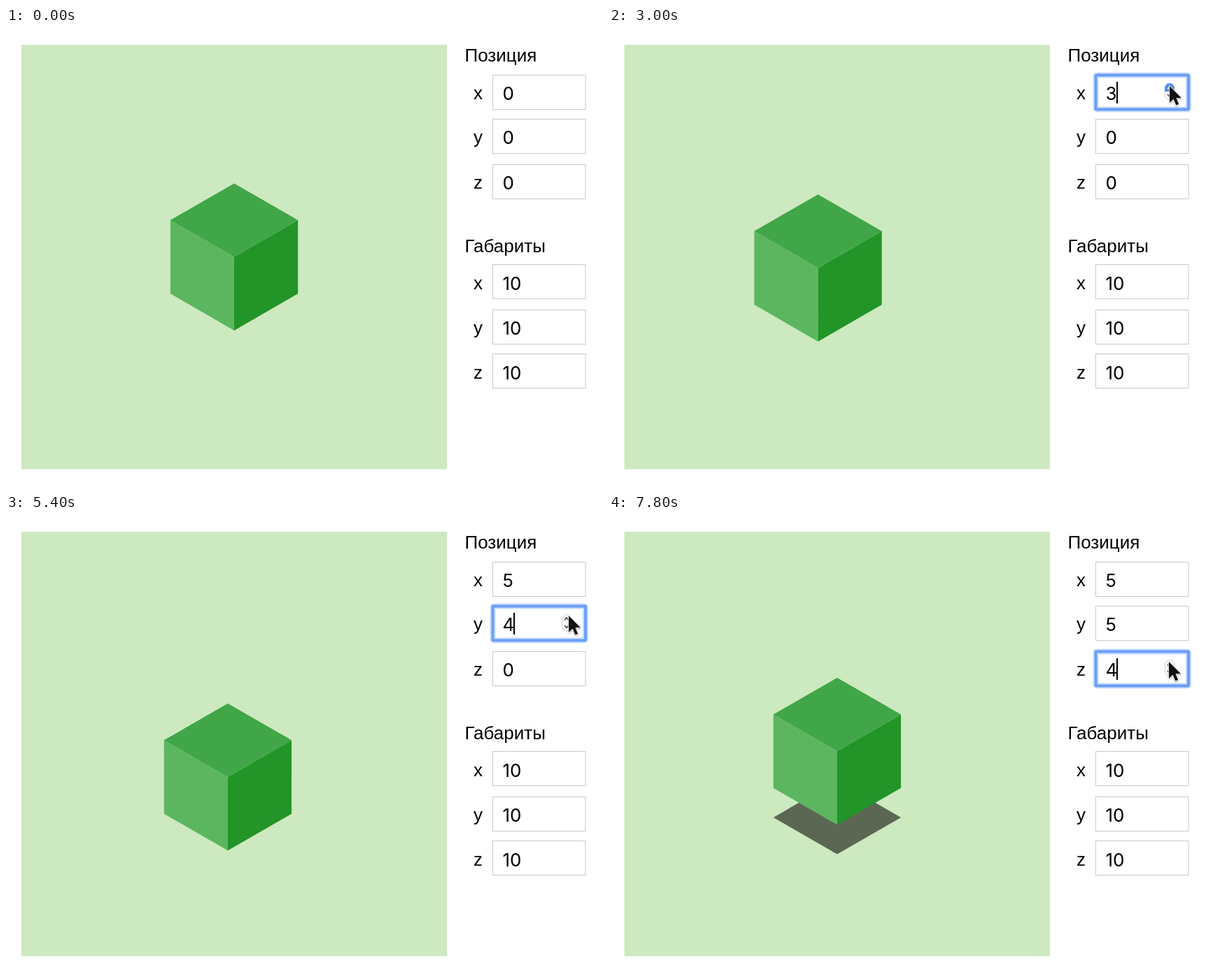
These frames come from a looping animation (853x657 px, 8 s). An HTML page:

```html
<!DOCTYPE html>
<html lang="ru">
<head>
<meta charset="utf-8">
<style>
  html, body { margin: 0; width: 100%; height: 100%; overflow: hidden; background: #fff; }
  svg { display: block; width: 853px; height: 657px; }
  .label { font: 26px "Liberation Sans", sans-serif; }
  .value { font: 26px Inter, sans-serif; }
</style>
</head>
<body>
<svg id="stage" viewBox="0 0 853 657"></svg>
<script>
const LOOP = 8000;
const stage = document.getElementById('stage');

function add(tag, attrs, parent = stage, text = '') {
  const node = document.createElementNS('http://www.w3.org/2000/svg', tag);
  for (const key in attrs) node.setAttribute(key, attrs[key]);
  node.textContent = text;
  parent.append(node);
  return node;
}
const show = (node, visible) => node.setAttribute('visibility', visible ? 'visible' : 'hidden');

// Isometric projection of model units to stage pixels.
const project = (x, y, z) => [326 + (y - x) * 9.11, 327.6 + (x + y) * 5.26 - z * 10.53];
const points = corners => corners.map(c => project(...c).join()).join(' ');

add('rect', { x: 22, y: 24, width: 608, height: 607.5, fill: '#cde9bf' });
const shadow = add('polygon', {
  points: points([[0, 0, -10], [10, 0, -10], [10, 10, -10], [0, 10, -10]].map(([x, y, z]) => [x, y, z])),
  fill: '#5b6653'
});
const cube = add('g', {});
const face = (fill, corners) => add('polygon', { fill, points: points(corners) }, cube);
face('#5cb660', [[10, 0, 0], [10, 10, 0], [10, 10, -10], [10, 0, -10]]);
face('#229428', [[10, 10, 0], [0, 10, 0], [0, 10, -10], [10, 10, -10]]);
face('#40a648', [[0, 0, 0], [10, 0, 0], [10, 10, 0], [0, 10, 0]]);
// The corner-based outline sits ten units high, so lift it to the middle of the field.
const LIFT = -105.2;

function addField(name, top, baseline, value) {
  add('text', { class: 'label', x: 668, y: baseline - 1 }, stage, name);
  const ring = add('g', { fill: 'none', visibility: 'hidden' });
  const box = { x: 695.5, y: top + .5, width: 132.5, height: 49 };
  add('rect', { ...box, fill: '#fff', stroke: '#c8c8c8' });
  stage.append(ring);
  add('rect', { ...box, rx: 2, stroke: '#a9c9fc', 'stroke-width': 8, opacity: .65 }, ring);
  add('rect', { ...box, rx: 1, stroke: '#6a9ff6', 'stroke-width': 4 }, ring);
  const text = add('text', { class: 'value', x: 709.5, y: baseline }, stage, value);
  const caret = add('rect', { y: top + 10, width: 2, height: 31 });

  const mid = top + 24;
  const spinner = add('g', { visibility: 'hidden' });
  add('rect', { x: 794.5, y: mid - 11.5, width: 13, height: 23, rx: 6.5, fill: '#fff', stroke: '#cfcfcf' }, spinner);
  const press = add('path', { d: `M794 ${mid}v-5a7 7 0 0 1 14 0v5z`, fill: '#4f8fec' }, spinner);
  const chevron = (y, dy) => add('path', {
    d: `M798 ${y}l3 ${dy}l3 ${-dy}`, fill: 'none', stroke: '#444', 'stroke-width': 1.5
  }, spinner);
  const up = chevron(mid - 3.5, -3.5);
  chevron(mid + 4, 3.5);
  return { ring, text, caret, spinner, press, up };
}

add('text', { class: 'label', x: 655.5, y: 48 }, stage, 'Позиция');
const fields = [['x', 67, 102.5], ['y', 130, 166], ['z', 195, 230.5]]
  .map(([name, top, base]) => addField(name, top, base, 0));
add('text', { class: 'label', x: 655.5, y: 321 }, stage, 'Габариты');
[['x', 338, 374.5], ['y', 403, 438.5], ['z', 466, 502.5]]
  .forEach(([name, top, base]) => addField(name, top, base, 10).caret.remove());

const cursor = add('path', {
  d: 'M0 0V24L5.6 18.8L9.3 27.6L13.2 25.9L9.5 17.3H17Z',
  fill: '#111', stroke: '#fff', 'stroke-width': 1.6, 'paint-order': 'stroke',
  style: 'filter:drop-shadow(0 1px 1px #0005)'
});

// Each step: start time and the properties that change then.
// at: cursor tip, focus / hover: field index, pos: cube position, down: arrow pressed.
const steps = [
  { t: 0, at: null, focus: -1, hover: -1, pos: [0, 0, 0], down: false },
  { t: 800, at: [578, 400] },
  { t: 1000, at: [650, 262] },
  { t: 1200, at: [738, 142] },
  { t: 1400, at: [773, 104] },
  { t: 1600, at: [784, 95], hover: 0 },
  { t: 1800, at: [790, 89] },
  { t: 2000, at: [798, 85] },
  { t: 2200, at: [801, 83] },
  { t: 2400, focus: 0, pos: [1, 0, 0], down: true },
  { t: 2600, down: false },
  { t: 3000, pos: [3, 0, 0], down: true },
  { t: 3200, pos: [4, 0, 0] },
  { t: 3400, pos: [5, 0, 0] },
  { t: 3600, down: false },
  { t: 4000, at: [802, 97] },
  { t: 4200, at: [803, 120], hover: -1 },
  { t: 4400, at: [804, 139], hover: 1 },
  { t: 4600, at: [804, 144] },
  { t: 4800, focus: 1, pos: [5, 1, 0], down: true },
  { t: 5000, pos: [5, 3, 0] },
  { t: 5200, pos: [5, 4, 0] },
  { t: 5400, down: false },
  { t: 5600, pos: [5, 5, 0], down: true },
  { t: 5800, down: false },
  { t: 6000, at: [803, 166] },
  { t: 6200, at: [802, 192], hover: -1 },
  { t: 6400, at: [802, 210], hover: 2 },
  { t: 6600, focus: 2, pos: [5, 5, 1], down: true },
  { t: 6800, down: false },
  { t: 7000, pos: [5, 5, 2], down: true },
  { t: 7200, pos: [5, 5, 3], down: false },
  { t: 7600, at: [800, 210], pos: [5, 5, 4], down: true },
  { t: 7800, down: false }
];
steps.forEach((step, i) => { steps[i] = { ...steps[i - 1], ...step }; });

function moveTo(node, x, y) {
  node.setAttribute('transform', `translate(${x} ${y})`);
}

function draw({ at, focus, hover, pos, down }) {
  const [x, y, z] = pos;
  const offset = h => {
    const [px, py] = project(x, y, h);
    return [px - 326, py - 327.6 + LIFT];
  };
  moveTo(cube, ...offset(z));
  moveTo(shadow, ...offset(0));
  show(shadow, z > 0);
  fields.forEach((field, i) => {
    const active = i === focus;
    const pressed = active && down;
    field.text.textContent = pos[i];
    field.caret.setAttribute('x', pos[i] === 1 ? 720 : 725);
    show(field.ring, active);
    show(field.caret, active);
    show(field.spinner, active || i === hover);
    show(field.press, pressed);
    field.up.setAttribute('stroke', pressed ? '#fff' : '#444');
    // Hidden parents need their parts hidden too.
    if (!active) show(field.press, false);
  });
  show(cursor, at);
  if (at) moveTo(cursor, ...at);
}

let current;
function frame() {
  const time = performance.now() % LOOP;
  const step = steps.findLast(s => s.t <= time);
  if (step !== current) draw(current = step);
  requestAnimationFrame(frame);
}
frame();
</script>
</body>
</html>
```
